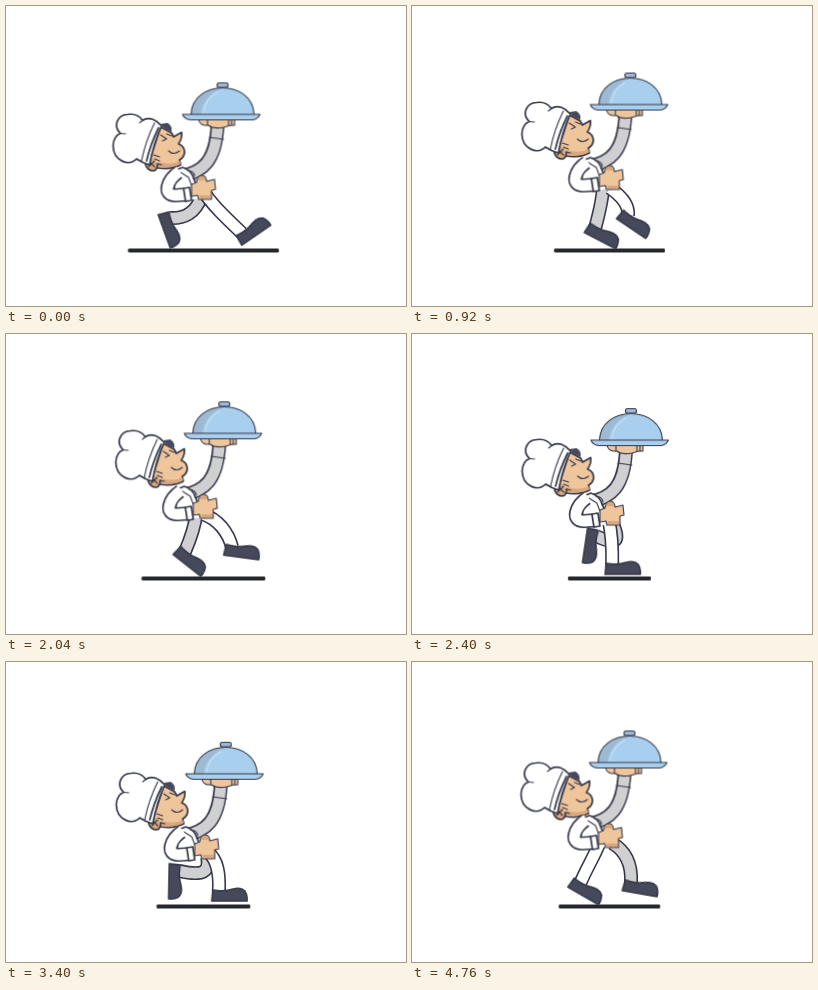
Recreate the animation shown at these times as an HTML page without scripts. Size 400 by 300 pixels, loop 4800 ms.

```html
<!DOCTYPE html>
<html lang="en">
<head>
<meta charset="utf-8">
<title>Walking waiter</title>
<style>
html, body { margin: 0; width: 100%; height: 100%; overflow: hidden; background: #fff; }
svg { display: block; width: 100vw; height: 100vh; }
path, rect { stroke-linejoin: round; stroke-linecap: round; }
.ink { stroke: #363949; stroke-width: 1.7; fill: none; }
.thin { stroke: #363949; stroke-width: 1.1; fill: none; }
.ink.white { fill: #fff; }
.skin { fill: #efc59c; }
.shade { fill: #d9a77c; }
.dark { fill: #464959; }
.steel { fill: #a9cfee; }
.dull { fill: #9dbad4; }
.edge, .fill { fill: none; stroke-linecap: butt; }
.edge { stroke: #363949; stroke-width: 14; }
.fill { stroke: var(--cloth); stroke-width: 10.8; }
.near { --cloth: #fff; }
.far { --cloth: #d0d0d3; }

/* One stride is 22.5% of the loop; every moving part supplies its own ten poses. */
.walk { animation: walk 4.8s linear infinite; }
@keyframes walk {
  0%, 22.5%, 45%, 67.5%, 90% { d: var(--d0); transform: var(--m0); }
  1.25%, 23.75%, 46.25%, 68.75%, 91.25% { d: var(--d1); transform: var(--m1); }
  3.333%, 25.833%, 48.333%, 70.833%, 93.333% { d: var(--d2); transform: var(--m2); }
  5.833%, 28.333%, 50.833%, 73.333%, 95.833% { d: var(--d3); transform: var(--m3); }
  9.167%, 31.667%, 54.167%, 76.667%, 99.167%, 100% { d: var(--d4); transform: var(--m4); }
  11.25%, 33.75%, 56.25%, 78.75% { d: var(--d5); transform: var(--m5); }
  12.5%, 35%, 57.5%, 80% { d: var(--d6); transform: var(--m6); }
  14.583%, 37.083%, 59.583%, 82.083% { d: var(--d7); transform: var(--m7); }
  17.083%, 39.583%, 62.083%, 84.583% { d: var(--d8); transform: var(--m8); }
  20%, 42.5%, 65%, 87.5% { d: var(--d9); transform: var(--m9); }
}

.bob { animation: bob 4.8s cubic-bezier(.37, 0, .63, 1) infinite; }
@keyframes bob {
  0% { transform: translateY(8.3px); animation-timing-function: ease-out; }
  2.292%, 13.542%, 24.792%, 36.042%, 47.292%, 58.542%, 69.792%, 81.042%, 92.292% { transform: translateY(13px); }
  7.917%, 19.167%, 30.417%, 41.667%, 52.917%, 64.167%, 75.417%, 86.667% { transform: translateY(-1.5px); }
  97.917% { transform: translateY(-1.5px); animation-timing-function: ease-in; }
  100% { transform: translateY(3px); }
}

.ground {
  --m0: scale(1, 1); --m1: scale(.842, 1); --m2: scale(.62, 1); --m3: scale(.513, 1); --m4: scale(.67, 1);
  --m5: scale(.895, 1); --m6: scale(.842, 1); --m7: scale(.62, 1); --m8: scale(.513, 1); --m9: scale(.816, 1);
}
.sway {
  --m0: translate(-1.5px); --m1: translate(.5px); --m2: translate(1.7px); --m3: translate(.5px); --m4: translate(-.5px);
  --m5: translate(-1px); --m6: translate(1px); --m7: translate(1.7px); --m8: translate(.5px); --m9: translate(.3px);
}
.nod {
  --m0: translate(-1px, -.5px); --m1: translate(-1px, -1.5px); --m2: translate(-1px, -1px); --m3: translate(0, -1px); --m4: translate(0, 0);
  --m5: translate(-1px, -.5px); --m6: translate(-2px, -1.5px); --m7: translate(-1px, -1px); --m8: translate(0, -1px); --m9: translate(0, -3px);
}
.near .leg {
  --d0: path("M196 183C205 198 220 212 236 227");
  --d1: path("M199 186C209 199 222 211 229 228");
  --d2: path("M202 190C212 198 214 212 213 230");
  --d3: path("M194 184C194 200 194 215 194 232");
  --d4: path("M187 182C182 195 174 207 168 222");
  --d5: path("M190 188C190 205 178 212 163 212");
  --d6: path("M190 190C190 205 178 212 164 212");
  --d7: path("M200 190C206 212 196 214 173 209");
  --d8: path("M200 187C213 210 204 208 190 199");
  --d9: path("M197 180C212 185 222 198 226 213");
}
.far .leg {
  --d0: path("M195 191C190 207 178 213 163 212");
  --d1: path("M195 191C190 207 178 213 164 212");
  --d2: path("M200 190C206 212 196 214 173 209");
  --d3: path("M200 187C213 210 204 208 190 199");
  --d4: path("M200 181C212 188 220 200 219 220");
  --d5: path("M198 184C207 198 221 212 235 227");
  --d6: path("M201 187C210 199 222 211 229 228");
  --d7: path("M202 190C212 198 214 212 213 230");
  --d8: path("M194 184C194 200 194 215 194 232");
  --d9: path("M190 180C189 193 184 206 179 218");
}
.near .shoe {
  --m0: translate(236px, 227px) rotate(-35deg);
  --m1: translate(229px, 228px) rotate(-22deg);
  --m2: translate(213px, 229px) rotate(0deg);
  --m3: translate(194px, 231px) rotate(0deg);
  --m4: translate(167px, 220px) rotate(30deg);
  --m5: translate(164px, 212px) rotate(70deg);
  --m6: translate(164px, 213px) rotate(70deg);
  --m7: translate(173px, 209px) rotate(91deg);
  --m8: translate(190px, 199px) rotate(102deg);
  --m9: translate(226px, 212px) rotate(8deg);
}
.far .shoe {
  --m0: translate(164px, 212px) rotate(70deg);
  --m1: translate(164px, 213px) rotate(70deg);
  --m2: translate(173px, 209px) rotate(91deg);
  --m3: translate(190px, 199px) rotate(102deg);
  --m4: translate(219px, 220px) rotate(10deg);
  --m5: translate(235px, 227px) rotate(-35deg);
  --m6: translate(229px, 228px) rotate(-22deg);
  --m7: translate(213px, 229px) rotate(0deg);
  --m8: translate(194px, 231px) rotate(0deg);
  --m9: translate(179px, 217px) rotate(38deg);
}
</style>
</head>
<body>
<svg viewBox="0 0 400 300">
  <defs>
    <path id="shoe" class="ink dark" d="M-6-1Q6 1 14-2Q22-4 26 0Q29 5 28 10H-7Z"/>
  </defs>

  <g transform="translate(197.5 244.500)">
    <g class="walk ground"><rect x="-76" y="-2" width="152" height="4" rx="2" fill="#26272b"/></g>
  </g>

  <g class="bob"><g class="walk sway far">
    <path class="edge" d="M176 162C199 158 211 146 213 111"/>
    <path class="fill" d="M176 162C199 158 211 146 213 113"/>
    <path class="thin" d="M205 123L219 125"/>
  </g></g>

  <g class="far">
    <path class="walk leg edge"/>
    <path class="walk leg fill"/>
    <g class="walk shoe"><use href="#shoe"/></g>
  </g>
  <g class="near">
    <path class="walk leg edge"/>
    <path class="walk leg fill"/>
    <g class="walk shoe"><use href="#shoe"/></g>
  </g>

  <g class="bob"><g class="walk sway near">
    <!-- jacket -->
    <path class="ink white" d="M180 186L170 178L168 157L178 153Q187 156 189 164L199 184"/>
    <path class="thin" d="M176 158L184 163L187 171M183 156Q190 157 190 162"/>

    <g class="walk nod">
      <path class="ink skin" d="M157 113L168 119L170 123L178 118.500Q179 124 175 130Q181 132 181 139Q180 144 176 146L177 151Q168 156 154 154L146 147Z"/>
      <path class="shade" d="M154 148Q168 152 176 147L177 150Q168 155 155 153Z"/>
      <path class="ink shade" d="M147 143Q141 144 142 151Q144 157 150 157Q154 156 154 150"/>
      <path class="dark" d="M157 110L164 109Q169 112 168 118L160 114Z"/>
      <path class="thin" d="M157 121L163 125L159 127M163 120L168 122M165 137Q170 142 176 137M145 147L151 153M151 147L145 153M150 141L156 143M151 145L156 147M154 150L158 151"/>
      <path class="ink white" d="M133 145C125 153 110 147 109.500 132Q110 122 117 119.500C109 112 114 101 124 100.500Q134 99 139 106.500C145 102 153 106 158 112Q150 129 146 151Q139 149 133 145Z"/>
      <path class="thin" d="M117 119.500L122 120M139 106.500L136 109M151 109Q142 127 138 147"/>
      <path class="ink" d="M155 114Q147 130 143 147"/>
    </g>

    <!-- tray -->
    <path class="thin skin" d="M194 105Q195 110 200 111H204Q209 115 219 113L226 111H230V105Z"/>
    <path class="thin" d="M203 106V111M224 106V111M227 106V111"/>
    <rect class="thin dull" x="212.500" y="68.500" width="11" height="4.500" rx="2"/>
    <path class="steel" d="M186.500 100C187 83 202 73.500 218 73.500S249 83 249.500 100Z"/>
    <path class="dull" d="M186.500 100C187 83 202 73.500 218 73.500Q198 82 196 100Z"/>
    <path d="M199 98Q201 84 213 78" fill="none" stroke="#c6e0f5" stroke-width="1.2"/>
    <path class="thin" d="M186.500 100C187 83 202 73.500 218 73.500S249 83 249.500 100"/>
    <path class="thin steel" d="M178 100H255.500Q253 105 248 105.500H186Q180 105 178 100Z"/>

    <!-- near arm and hand -->
    <path class="edge" d="M174 158C163 165 157 181 171 181L184 180"/>
    <path class="fill" d="M175 157C163 165 157 181 171 181L184 180"/>
    <path class="ink white" d="M179 174L185 173L187 186L181 187Z"/>
    <path class="thin skin" d="M187 170L192 168Q193 161 198 161Q202 162 202 167L210 165L211 175L207 176V185H194L193 181L187 182Z"/>
    <path class="shade" d="M193 166Q194 161 198 162Q201 163 201 166ZM195 181H206V184H195Z"/>
  </g></g>
</svg>
</body>
</html>
```
